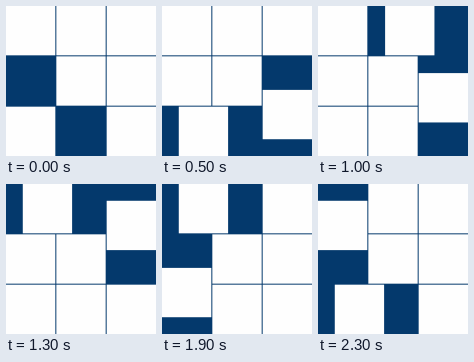
These frames come from a looping animation (150x150 px, 2400 ms). An HTML page:

```html
<!DOCTYPE html>
<html lang="en">
<head>
<meta charset="utf-8">
<title>Sliding tiles</title>
<style>
  html, body { margin: 0; width: 100%; height: 100%; overflow: hidden; background: #04396c; }
  svg { display: block; width: 100vw; height: 100vh; }
</style>
</head>
<body>
<svg viewBox="0 0 150 150"><g id="board" fill="#fefefe"></g></svg>
<script>
const SIZE = 150, GAP = 1, STEP_MS = 100, STEPS = 6, TURNS = 4;
const TILE = (SIZE - 2 * GAP) / 3;
const PITCH = TILE + GAP;
const board = document.getElementById('board');

const tiles = Array.from({ length: 7 }, () => {
  const rect = document.createElementNS('http://www.w3.org/2000/svg', 'rect');
  rect.setAttribute('width', TILE);
  rect.setAttribute('height', TILE);
  return board.appendChild(rect);
});

// Column and row of each tile; two tiles slide in each half of a turn.
function layout(step) {
  const first = Math.min(step, 3) / 3;
  const second = Math.max(step - 3, 0) / 3;
  return [
    [0, 0], [1, 0], [2, 0], [1, 1],
    [0, 2 - first],
    [2 - first - second, 2],
    [2, 1 + second]
  ];
}

// Every turn repeats the same slides, rotated a quarter counterclockwise.
function render(ms) {
  const tick = Math.floor(ms / STEP_MS) % (STEPS * TURNS);
  const turn = Math.floor(tick / STEPS);
  board.setAttribute('transform', `rotate(${-90 * turn} ${SIZE / 2} ${SIZE / 2})`);
  layout(tick % STEPS).forEach(([col, row], i) => {
    tiles[i].setAttribute('x', col * PITCH);
    tiles[i].setAttribute('y', row * PITCH);
  });
}

const start = performance.now();
function frame() {
  render(performance.now() - start);
  requestAnimationFrame(frame);
}
frame();
</script>
</body>
</html>
```
